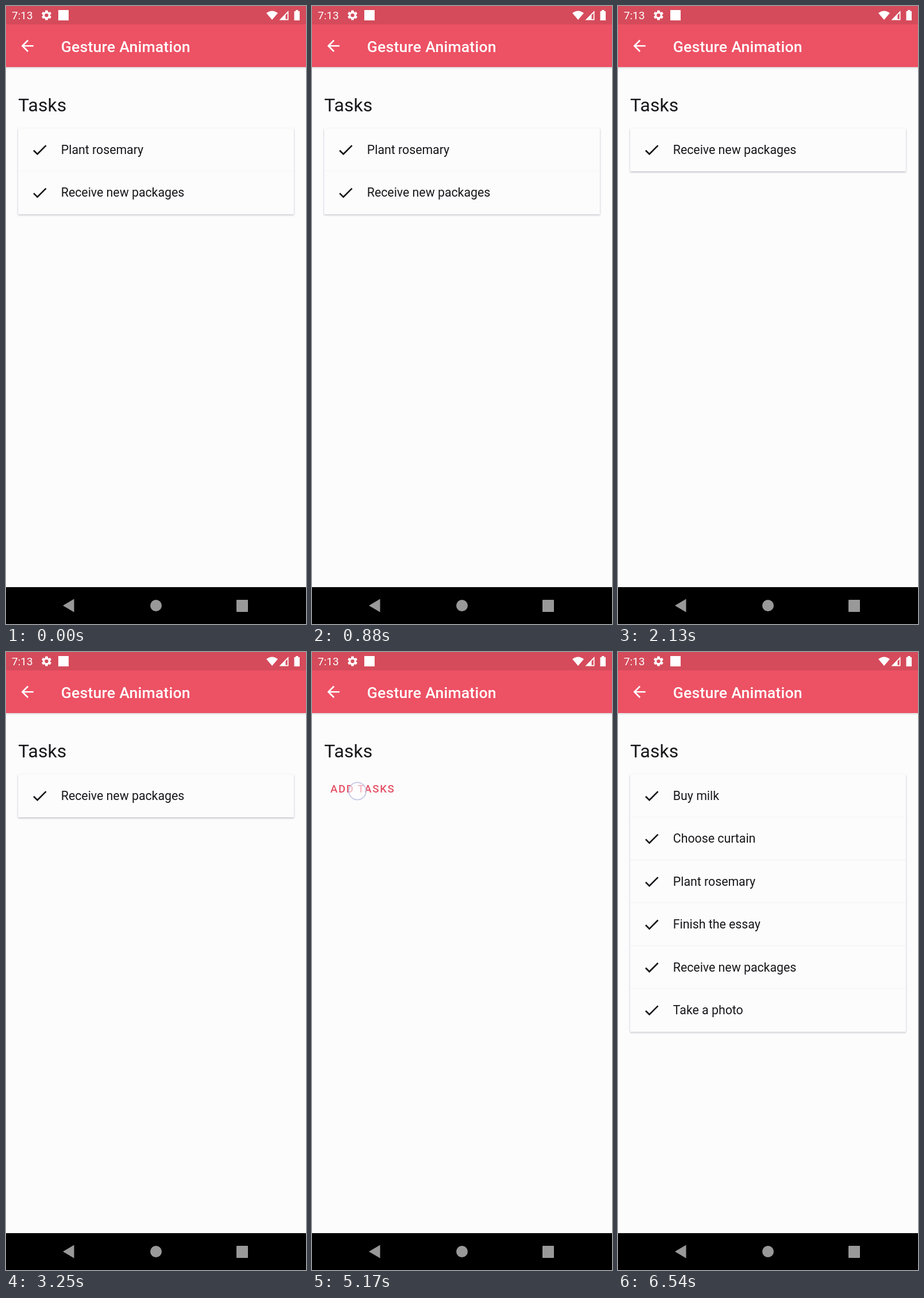
Write an HTML page that moves like this. It is 522 px wide and 1073 px high and loops after 6580 ms.

```html
<!DOCTYPE html>
<html lang="en">
<head>
<meta charset="utf-8">
<title>Gesture Animation</title>
<style>
  html, body { margin: 0; width: 100%; height: 100%; overflow: hidden; background: #fcfcfd; }
  svg { display: block; width: 100%; height: 100%; font-family: Roboto, sans-serif; }
  .card rect { fill: #fcfcfd; filter: url(#shadow); }
  .card text { font-size: 21.3px; fill: #17171a; }
</style>
</head>
<body>
<svg viewBox="0 0 522 1073">
  <defs>
    <filter id="shadow" x="-5%" y="-20%" width="110%" height="150%">
      <feDropShadow dx="0" dy="1.4" stdDeviation="1.7" flood-color="#15152c" flood-opacity=".3"/>
    </filter>
    <linearGradient id="barShade" x2="0" y2="1">
      <stop stop-color="#000" stop-opacity=".13"/>
      <stop offset="1" stop-color="#000" stop-opacity="0"/>
    </linearGradient>
    <path id="check" d="M9 16.17 4.83 12l-1.42 1.41L9 19 21 7l-1.41-1.41z"/>
  </defs>

  <rect width="522" height="1073" fill="#fcfcfd"/>
  <text x="21.3" y="183" font-size="31.95" fill="#17171a">Tasks</text>
  <text id="add" x="32" y="244" font-size="18.6" font-weight="500" letter-spacing="1.66" fill="#e65064">ADD TASKS</text>
  <g id="list"></g>
  <circle id="finger" r="15" fill="#fff" fill-opacity=".6" stroke="#b9bbdc" stroke-opacity=".75" stroke-width="2"/>

  <rect y="106" width="522" height="4" fill="url(#barShade)"/>
  <rect width="522" height="106" fill="#ed5164"/>
  <rect width="522" height="32" fill="#d54b5b"/>
  <g fill="#fff">
    <path transform="translate(21.3 53.3) scale(1.331)" d="M20 11H7.83l5.59-5.59L12 4l-8 8 8 8 1.41-1.41L7.83 13H20z"/>
    <text x="95.8" y="80" font-size="26.6" font-weight="500" letter-spacing=".2">Gesture Animation</text>
    <text x="10" y="23" font-size="19">7:13</text>
    <path transform="translate(59.8 5.4) scale(.89)" d="M19.14 12.94c.04-.3.06-.61.06-.94 0-.32-.02-.64-.07-.94l2.03-1.58c.18-.14.23-.41.12-.61l-1.92-3.32c-.12-.22-.37-.29-.59-.22l-2.39.96c-.5-.38-1.03-.7-1.62-.94l-.36-2.54c-.04-.24-.24-.41-.48-.41h-3.84c-.24 0-.43.17-.47.41l-.36 2.54c-.59.24-1.13.57-1.62.94l-2.39-.96c-.22-.08-.47 0-.59.22L2.74 8.87c-.12.21-.08.47.12.61l2.03 1.58c-.05.3-.09.63-.09.94s.02.64.07.94l-2.03 1.58c-.18.14-.23.41-.12.61l1.92 3.32c.12.22.37.29.59.22l2.39-.96c.5.38 1.03.7 1.62.94l.36 2.54c.05.24.24.41.48.41h3.84c.24 0 .44-.17.47-.41l.36-2.54c.59-.24 1.13-.56 1.62-.94l2.39.96c.22.08.47 0 .59-.22l1.92-3.32c.12-.22.07-.47-.12-.61zM12 15.6a3.6 3.6 0 1 1 0-7.2 3.6 3.6 0 0 1 0 7.2z"/>
    <rect x="91" y="7" width="18" height="18"/>
    <path d="M463 24 453 12.300Q463 4.500 473 12.300z"/>
    <path fill-rule="evenodd" d="M475.500 24.500 491.500 8v16.500zM486.500 22.700h3.200V12.500l-3.200 3.300z"/>
    <path d="M504 7h4.500v2h2.500v16h-9.500V9h2.500z"/>
  </g>

  <rect y="1009" width="522" height="64"/>
  <g fill="#999">
    <path d="M99 1041 118.500 1029.500v23z"/>
    <circle cx="261" cy="1041" r="10"/>
    <rect x="401" y="1031" width="20" height="21" rx="1"/>
  </g>
</svg>
<script>
const LOOP = 6580;
const TASKS = ["Buy milk", "Choose curtain", "Plant rosemary", "Finish the essay", "Receive new packages", "Take a photo"];
const ROW = 74.45, TOP = 212.5;
const PLANT = 2, PACKAGES = 4;

// Press, pull with growing speed, then fling with decay and remove.
const DRAG_FROM = 60, RELEASE = 300, REMOVE = 720, PULL = 0.0048, DECAY = 150;
const swipes = [
  { task: PLANT, start: 1390, x: 203, y: 262 },
  { task: PACKAGES, start: 3330, x: 203, y: 258 }
];
const TAP = { from: 5060, to: 5260, x: 79, y: 241.5 };
const REFILL = 5300;

const byId = id => document.getElementById(id);
const list = byId("list"), add = byId("add"), finger = byId("finger");
const show = (el, on) => el.setAttribute("visibility", on ? "visible" : "hidden");

list.innerHTML = TASKS.map(name => `
  <g class="card">
    <rect x="21.2" width="479.600" height="${ROW}"/>
    <use href="#check" transform="translate(42.6 21.300) scale(1.331)" fill="#17171a"/>
    <text x="95.8" y="44.500">${name}</text>
  </g>`).join("");
const cards = [...list.children];

function dragOffset(u) {
  const held = Math.max(0, Math.min(u, RELEASE) - DRAG_FROM);
  const pulled = PULL * held * held;
  if (u <= RELEASE) return pulled;
  const speed = 2 * PULL * held;
  return pulled + speed * DECAY * (1 - Math.exp((RELEASE - u) / DECAY));
}

function visibleTasks(t) {
  if (t >= REFILL) return TASKS.map((_, i) => i);
  return swipes.filter(s => t < s.start + REMOVE).map(s => s.task);
}

function touchAt(t) {
  const s = swipes.find(s => t >= s.start && t < s.start + RELEASE);
  if (s) {
    const u = t - s.start;
    return { x: s.x - 10 * Math.max(0, 1 - u / DRAG_FROM) + dragOffset(u), y: s.y };
  }
  return t >= TAP.from && t < TAP.to ? TAP : null;
}

function draw(t) {
  const shown = visibleTasks(t);
  cards.forEach((card, i) => {
    const row = shown.indexOf(i);
    show(card, row >= 0);
    if (row < 0) return;
    const s = swipes.find(s => s.task === i && t >= s.start && t < s.start + REMOVE);
    const dx = s ? dragOffset(t - s.start) : 0;
    card.setAttribute("transform", `translate(${dx} ${TOP + row * ROW})`);
  });
  show(add, !shown.length);

  const touch = touchAt(t);
  show(finger, touch);
  if (touch) finger.setAttribute("transform", `translate(${touch.x} ${touch.y})`);
}

const began = performance.now();
function tick() {
  draw((performance.now() - began) % LOOP);
  requestAnimationFrame(tick);
}
tick();
</script>
</body>
</html>
```
